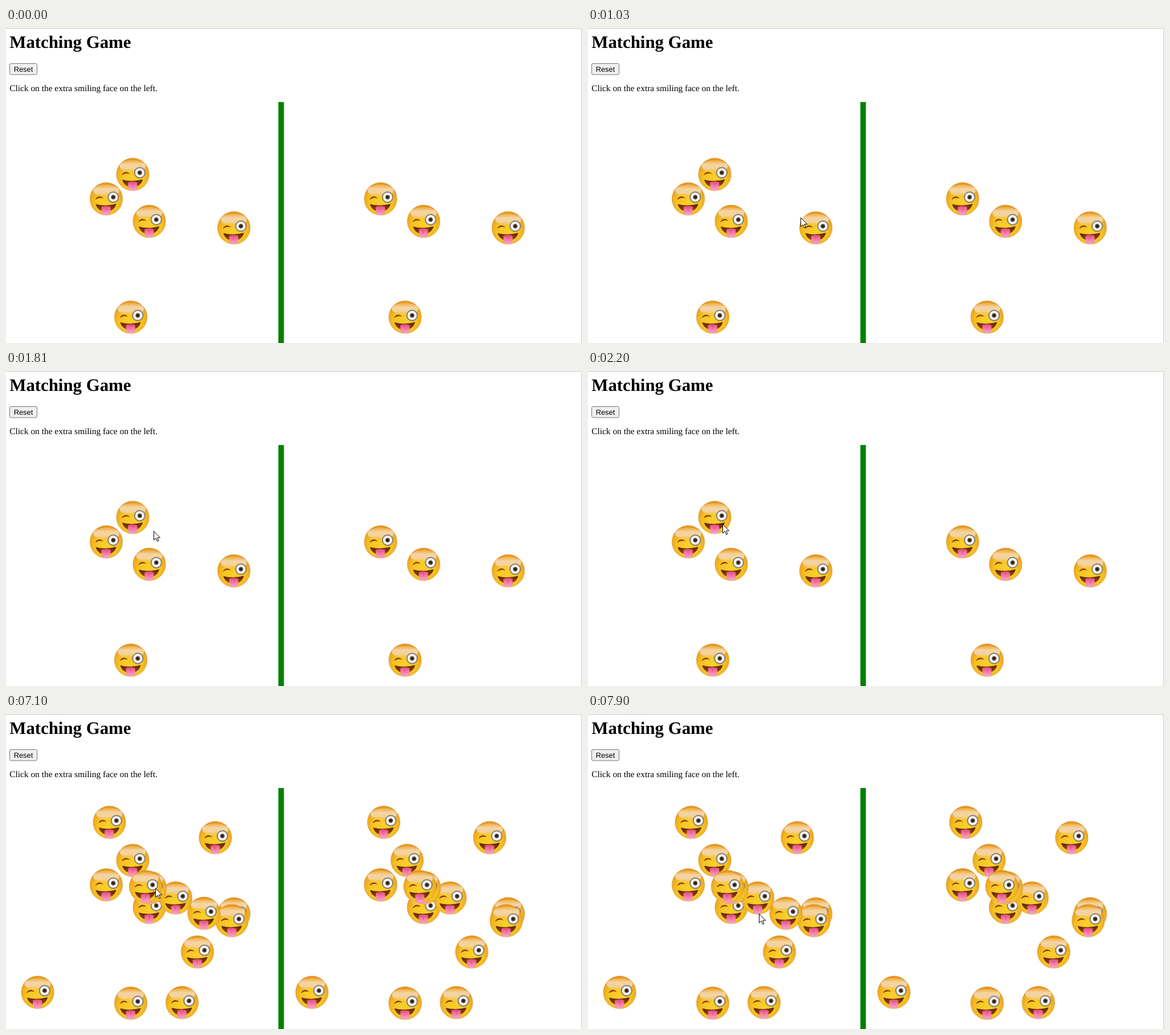
An HTML page for the animation above (8 s loop, 1011 by 554 pixels).

```html
<!DOCTYPE html>
<html lang="en">
<head>
<meta charset="utf-8">
<title>Matching Game</title>
<style>
html, body { margin: 0; width: 100%; height: 100%; overflow: hidden; background: #fff; }
svg { display: block; width: 1011px; height: 554px; }
text { text-rendering: geometricPrecision; }
.serif { font-family: "Liberation Serif", "Times New Roman", serif; }
.sans { font-family: "Liberation Sans", Arial, sans-serif; }
</style>
</head>
<body>
<svg viewBox="0 0 1011 554">
  <defs>
    <radialGradient id="skin" gradientUnits="userSpaceOnUse" cx="0" cy="6" r="35">
      <stop offset="0" stop-color="#fad02a"/>
      <stop offset=".55" stop-color="#f6c324"/>
      <stop offset=".8" stop-color="#efab20"/>
      <stop offset="1" stop-color="#e38d1c"/>
    </radialGradient>
    <linearGradient id="shine" x1="0" y1="0" x2="0" y2="1">
      <stop offset="0" stop-color="#f2b866" stop-opacity=".5"/>
      <stop offset=".35" stop-color="#f4d4a4"/>
      <stop offset=".7" stop-color="#f3d29c"/>
      <stop offset="1" stop-color="#f4c655" stop-opacity=".2"/>
    </linearGradient>
    <linearGradient id="mouth" x1="0" y1="0" x2="0" y2="1">
      <stop offset="0" stop-color="#5e2405"/>
      <stop offset="1" stop-color="#9a4a0a"/>
    </linearGradient>
    <linearGradient id="tongue" x1="0" y1="0" x2="0" y2="1">
      <stop offset="0" stop-color="#e6477e"/>
      <stop offset=".45" stop-color="#f27aa6"/>
      <stop offset="1" stop-color="#f5a6cb"/>
    </linearGradient>
    <radialGradient id="eye">
      <stop offset=".6" stop-color="#fff"/>
      <stop offset="1" stop-color="#d5d3d0"/>
    </radialGradient>
    <g id="face">
      <circle r="28.7" fill="url(#skin)" stroke="#d9a050" stroke-width=".7"/>
      <ellipse cy="-14.5" rx="23" ry="10.5" fill="url(#shine)"/>
      <path d="M-19.5 1.6C-17 -5.5 -8.5 -6.3 -5 -.4C-9.5 -2.9 -14 -2 -19.5 1.6Z" fill="#87400c"/>
      <circle cx="12.3" cy="-3" r="9.2" fill="url(#eye)" stroke="#7b766a" stroke-width="1.7"/>
      <circle cx="12.3" cy="-3" r="4.3" fill="#85796c"/>
      <circle cx="12.3" cy="-3" r="2.9" fill="#35231c"/>
      <path d="M-18.5 9.2Q-1 14 17.5 8.8C16.5 15 10.5 22.5 -.5 22.5S-17 15.5 -18.5 9.2Z" fill="url(#mouth)"/>
      <path d="M-8.3 13.8Q-.5 11 7.7 13.8V23Q7.5 28.4 -.3 28.4T-8.3 23Z" fill="url(#tongue)"/>
      <path d="M-.3 14.5V22" stroke="#d93f78" stroke-width="1" opacity=".65"/>
    </g>
  </defs>
  <rect width="1011" height="554" fill="#fff"/>
  <path d="M0 .5H1010.5V554" fill="none" stroke="#c9c9c9"/>
  <text class="serif" x="6.3" y="34.5" font-size="30.82" font-weight="700">Matching Game</text>
  <rect x="6.5" y="62.5" width="48" height="19.5" rx="2.5" fill="#efefef" stroke="#767676"/>
  <text class="sans" x="13.7" y="76.6" font-size="12.84">Reset</text>
  <text class="serif" x="6.2" y="111.4" font-size="15.41">Click on the extra smiling face on the left.</text>
  <rect x="478.1" y="130.2" width="9.63" height="424" fill="#008000"/>
  <g id="first"></g>
  <g id="second"></g>
  <path id="cursor" d="M.5 .6V16.4L4.2 12.9L6.7 18.6L9 17.6L6.6 12.1H11.6Z" fill="#fff" stroke="#000"/>
</svg>
<script>
const LOOP = 8000, STEP = 130, LEVEL_UP = 2470, COLUMN = 481.5;
const $ = id => document.getElementById(id);

// Face centres in stacking order; the last face of each level is the extra one
const spots = [
  [176, 300.5], [251.5, 340], [400, 351.5], [219, 508.5], [222.5, 257.5],
  [181.5, 190.5], [367.5, 217.5], [298, 323.5], [253, 305.5], [245, 303.5],
  [396.5, 363.5], [336, 418.5], [55.5, 489.5], [309, 507.5], [347.5, 350.5]
];
const FIRST = 5, SECOND = spots.length;

const faces = (count, dx = 0) => spots.slice(0, count)
  .map(([x, y]) => `<use href="#face" x="${x + dx}" y="${y}"/>`).join("");
const right = count => faces(count - 1, COLUMN);

$("first").innerHTML = faces(FIRST) + right(FIRST);
// The right column keeps its earlier faces beneath the new copies
$("second").innerHTML = faces(SECOND) + right(FIRST) + right(SECOND);

const smooth = u => u * u * (3 - 2 * u);
const slowDown = u => 1 - (1 - u) ** 1.4;

// Pointer moves; it rests where the last one ended
const moves = [
  { at: 380, steps: 6, from: [943, 540], to: [327, 316], ease: smooth },
  { at: 1160, steps: 8, from: [327, 316], to: [236, 269], ease: slowDown },
  { at: 7100, steps: 2, from: [262, 306], to: [300, 344], ease: slowDown },
  { at: 7770, steps: 1, from: [300, 348], to: [300, 351], ease: slowDown }
];

function pointerAt(t) {
  const move = moves.filter(m => m.at <= t).pop();
  if (!move) return null;
  const { at, steps, from, to, ease } = move;
  const k = ease(Math.min(Math.floor((t - at) / STEP), steps) / steps);
  return from.map((v, i) => Math.round(v + (to[i] - v) * k));
}

const show = (id, on) => $(id).setAttribute("visibility", on ? "visible" : "hidden");

function draw(t) {
  show("first", t < LEVEL_UP);
  show("second", t >= LEVEL_UP);
  const spot = pointerAt(t);
  show("cursor", spot);
  if (spot) $("cursor").setAttribute("transform", `translate(${spot})`);
}

const begin = performance.now();
function tick() {
  draw((performance.now() - begin) % LOOP);
  requestAnimationFrame(tick);
}
tick();
</script>
</body>
</html>
```
